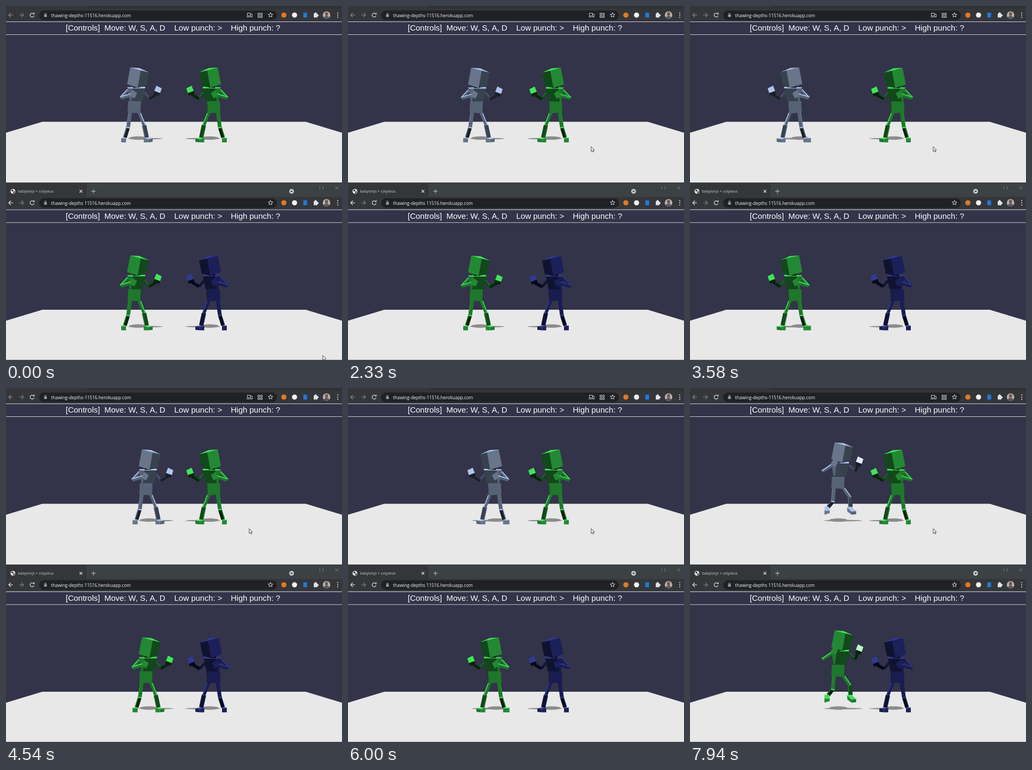
An HTML page with a canvas for the animation above (8000 ms loop, 630 by 662 pixels).

```html
<!DOCTYPE html>
<html lang="en">
<head>
<meta charset="utf-8">
<title>Fighters in two windows</title>
<style>
html, body { margin: 0; width: 100%; height: 100%; overflow: hidden; background: #333349; }
canvas { display: block; }
</style>
</head>
<body>
<canvas id="stage" width="630" height="662"></canvas>
<script>
const ctx = document.getElementById('stage').getContext('2d');
const LOOP = 8000, CENTER = 315;
const UI_FONT = '"Open Sans", "Noto Sans", sans-serif';

const palettes = {
  grey:  { light: '#acc5ee', face: '#69758b', mid: '#566377', dark: '#37424f', deep: '#191f27' },
  green: { light: '#3fe557', face: '#238833', mid: '#1e772b', dark: '#12481b', deep: '#07230b' },
  blue:  { light: '#303a95', face: '#1b205a', mid: '#181c50', dark: '#101330', deep: '#070816' }
};

// Joint x is relative to the fighter's centre; the fighter faces right.
const guard = {
  head: [0, 115], chest: [0, 153], hips: [0, 178],
  shoulderL: [-12, 157], elbowL: [-26, 172], handL: [-2, 165],
  shoulderR: [18, 162], elbowR: [27, 173], handR: [44, 157],
  hipL: [-8, 199], kneeL: [-12, 227], ankleL: [-18, 246], footL: [-20.5, 251],
  hipR: [9, 200], kneeR: [18, 223], ankleR: [23, 246], footR: [25.5, 251]
};
const leap = {
  head: [5, 102], chest: [4, 140], hips: [4, 166],
  shoulderL: [-6, 144], elbowL: [-26, 156], handL: [-3, 140],
  shoulderR: [24, 145], elbowR: [35, 156], handR: [44, 136],
  hipL: [-4, 187], kneeL: [-6, 212], ankleL: [-15, 223], footL: [-16.5, 230],
  hipR: [14, 188], kneeR: [26, 205], ankleR: [27, 223], footR: [29, 230]
};
const upperBody = ['head', 'chest', 'shoulderL', 'elbowL', 'handL', 'shoulderR', 'elbowR', 'handR'];

// Time and centre of the walking fighter.
const walk = [[3433, 241], [3770, 140], [4133, 140], [4920, 377], [4990, 362],
              [5710, 362], [6067, 255], [6300, 255], [6363, 274]];
const blueTurns = [0, 780, 1560, 2330, 3580, 4800, 6780, 7940, 9000];

const clamp = v => Math.max(0, Math.min(1, v));
const smooth = v => { v = clamp(v); return v * v * (3 - 2 * v); };
const mix = (a, b, k) => a + (b - a) * k;
const breathe = t => (1 - Math.cos(t / 1530 * 2 * Math.PI)) / 2;

function walkX(t) {
  const next = walk.findIndex(key => key[0] > t);
  if (next === 0) return walk[0][1];
  if (next < 0) return walk[walk.length - 1][1];
  const [t0, x0] = walk[next - 1], [t1, x1] = walk[next];
  return mix(x0, x1, (t - t0) / (t1 - t0));
}

function walkSway(t) {
  if (t < 3433) return breathe(t);
  if (t >= 6363) return breathe(t - 6363) * .5;
  return t >= 4990 && t < 5710 ? breathe(t - 4990) : 0;
}

function blueSway(t) {
  const i = blueTurns.findIndex(turn => turn > t) - 1;
  const k = smooth((t - blueTurns[i]) / (blueTurns[i + 1] - blueTurns[i]));
  return i % 2 ? 1 - k : k;
}

function makePose(sway, jump) {
  const pose = {};
  for (const name in guard) {
    pose[name] = [0, 1].map(axis => mix(guard[name][axis], leap[name][axis], jump));
  }
  for (const name of upperBody) {
    pose[name][0] -= sway * 2;
    pose[name][1] += sway * (name === 'handR' ? 1.5 : .6);
  }
  return pose;
}

// View is 0 at the opening stance and grows as perspective shows more of the back.
function makeFighter(color, x, dir, sway, jump = 0) {
  const view = (dir * (x - CENTER) + 74) / 190;
  return { color, x, dir, jump, view, pose: makePose(sway, jump) };
}

function poly(color, points, [dx, dy] = [0, 0]) {
  ctx.beginPath();
  for (let i = 0; i < points.length; i += 2) ctx.lineTo(points[i] + dx, points[i + 1] + dy);
  ctx.closePath();
  ctx.fillStyle = color;
  ctx.fill();
}

function rect(color, x, y, w, h) {
  ctx.fillStyle = color;
  ctx.fillRect(x, y, w, h);
}

function line(color, width, ...points) {
  ctx.beginPath();
  for (let i = 0; i < points.length; i += 2) ctx.lineTo(points[i], points[i + 1]);
  ctx.strokeStyle = color;
  ctx.lineWidth = width;
  ctx.stroke();
}

function disc(color, x, y, rx, ry = rx) {
  ctx.beginPath();
  ctx.ellipse(x, y, rx, ry, 0, 0, 7);
  ctx.fillStyle = color;
  ctx.fill();
}

function ring(color, x, y, r, from = 0, to = 2 * Math.PI) {
  ctx.beginPath();
  ctx.arc(x, y, r, from, to);
  ctx.strokeStyle = color;
  ctx.lineWidth = 1.2;
  ctx.stroke();
}

function text(value, x, y, font, color) {
  ctx.font = font;
  ctx.fillStyle = color;
  ctx.fillText(value, x, y);
}

// A limb with a lit strip; side picks the lit edge.
function limb(a, b, width, color, lit, side = 1) {
  const length = Math.hypot(b[0] - a[0], b[1] - a[1]);
  const nx = (b[1] - a[1]) / length * side, ny = -(b[0] - a[0]) / length * side;
  const shift = width / 2 - .8;
  line(color, width, ...a, ...b);
  line(lit, 1.6, a[0] + nx * shift, a[1] + ny * shift, b[0] + nx * shift, b[1] + ny * shift);
}

function drawShadow(p, c, { jump, view }) {
  const x = -17 * view;
  disc('#8b8b8b', 20 - jump * 4 + x, 248, 33 + jump * 3, 1.4);
  disc('#8b8b8b', 7 + x, 247, 17, 3.3);
}

function drawLimbs(p, c, { jump, view }) {
  limb(p.shoulderR, p.elbowR, 5, c.dark, c.mid);
  limb(p.elbowR, [p.handR[0] - 4, p.handR[1] + 8], 6, c.deep, c.dark);

  limb(p.kneeL, p.ankleL, 7, c.deep, c.mid, -1);
  limb(p.hipL, p.kneeL, 7, c.mid, c.face, -1);
  limb([p.kneeL[0] - 3, p.kneeL[1]], [p.kneeL[0] + 3, p.kneeL[1] + 1], 2, c.light, c.light);
  limb(p.kneeR, p.ankleR, 8, c.dark, c.mid, -1);
  limb(p.hipR, p.kneeR, 6, c.mid, c.light);

  const tilt = jump * 3, heel = -4.5 - 5 * view;
  poly(c.face, [heel, -4, 4.5, -4 + tilt, 4.5, 4, heel, 4 + tilt], p.footL);
  poly(c.light, [heel, -5 - tilt, 3, -5 - tilt, 4.5, -3.5 + tilt, heel, -3.5 + tilt], p.footL);
  poly(c.face, [-8.5, -4 - tilt, 0, -2 + tilt, 0, 4 + tilt, -8, 4 - tilt], p.footR);
  poly(c.mid, [0, -2 + tilt, 8.5, -3 + tilt, 8.5, 3 + tilt, 0, 4 + tilt], p.footR);
  poly(c.light, [-8.5, -4 - tilt, -1, -5 - tilt, 8.5, -3 + tilt, 0, -2 + tilt], p.footR);
}

function drawCore(p, c, { view }) {
  poly(c.mid, [-12, 0, 12, 0, 11, 23, -13, 21], p.hips);
  poly(c.dark, [12, 0, 13, 1, 12, 21, 11, 23], p.hips);

  poly(c.dark, [-4, 0, 20, 0, 15, 25, -8, 25], p.chest);
  poly(c.mid, [-13, 1, -3, 0, -6, 25, -9, 25], p.chest);
  poly(c.light, [-14, -1, 20, -2, 20, 1, -12, 1], p.chest);

  const edge = 4 * view;
  poly(c.deep, [-3, 33, 8, 33, 8, 38, -3, 38], p.head);
  poly(c.face, [-8, 0, 12 + edge, 5, 6 + edge, 38, -14, 31], p.head);
  poly(c.dark, [12 + edge, 5, 27, 9, 22, 34, 6 + edge, 38], p.head);
  poly(c.light, [-8, 0, 9, 1, 27, 9, 12 + edge, 5.5], p.head);
}

function drawNearArm(p, c, { jump }) {
  limb(p.shoulderL, p.elbowL, 5, c.mid, c.light, -1);
  limb(p.elbowL, p.handL, 6 - jump * 2, c.mid, c.light);
  poly(c.face, [-2, -8, 7, -2, 2, 8, -7, 3], p.handL);
  poly(c.dark, [7, -2, 10, 1, 5, 9, 2, 8], p.handL);
}

function drawFist(p, c, { jump }) {
  poly(c.light, [-3, -8, 7, -3, 4, 6, -7, 2], p.handR);
  poly(`rgba(255,255,255,${jump * .65})`, [-3, -8, 7, -3, 4, 6, -7, 2], p.handR);
  poly(c.deep, [-7, 2, 4, 6, 2, 11, -8, 8], p.handR);
}

function drawLayer(draw, [left, right]) {
  const middle = (left.x + right.x) / 2;
  for (const fighter of [left, right]) {
    ctx.save();
    if (draw === drawCore) {
      // Overlapping bodies meet halfway between the two fighters.
      ctx.beginPath();
      ctx.rect(fighter === left ? 0 : middle, 54, fighter === left ? middle : 630, 276);
      ctx.clip();
    }
    ctx.translate(fighter.x, 0);
    ctx.scale(fighter.dir, 1);
    draw(fighter.pose, palettes[fighter.color], fighter);
    ctx.restore();
  }
}

function drawArena(fighters) {
  rect('#333349', 0, 29, 630, 301);
  poly('#e8e8e8', [0, 237, 68, 216.5, 562, 216.5, 630, 237, 630, 330, 0, 330]);
  for (const draw of [drawShadow, drawLimbs, drawCore, drawNearArm, drawFist]) {
    drawLayer(draw, fighters);
  }
  rect('#d0d0d6', 0, 29, 630, 1);
  rect('#c8c8d0', 0, 53, 630, 1);
  const labels = [['[Controls]', 112], ['Move: W, S, A, D', 184.5],
                  ['Low punch: >', 315.5], ['High punch: ?', 421.5]];
  for (const [label, x] of labels) {
    text(label, x, 46.2, '15px "Liberation Sans", Arial, sans-serif', '#ffffff');
  }
}

function drawArrow(x, dir, color) {
  line(color, 1.2, x - 4 * dir, 17, x + 4 * dir, 17);
  line(color, 1.2, x, 13, x + 4 * dir, 17, x, 21);
}

function drawStar(x, y) {
  const points = [];
  for (let i = 0; i <= 10; i++) {
    const r = i % 2 ? 2 : 4.6, a = i * Math.PI / 5 - Math.PI / 2;
    points.push(x + r * Math.cos(a), y + r * Math.sin(a));
  }
  line('#d5d7da', 1, ...points);
}

function drawToolbar(address, active) {
  const icon = '#dee1e6';
  rect('#35363a', 0, 5, 630, 24);
  drawArrow(9, -1, active ? icon : '#85888c');
  drawArrow(29, 1, '#7b7e82');
  ring(icon, 49, 17, 3.7, .3, 5.5);
  poly(icon, [50, 15.5, 53.5, 15.5, 53.5, 12]);
  ctx.beginPath();
  ctx.roundRect(62, 8.5, 446, 18, 9);
  ctx.fillStyle = '#202124';
  ctx.fill();
  rect('#9aa0a6', 71.5, 16, 5, 4.5);
  ring('#9aa0a6', 74, 15.5, 1.7, Math.PI, 0);
  text(address, 84.5, 20.5, '8.3px ' + UI_FONT, '#f4f5f7');

  if (!active) {
    ctx.strokeStyle = '#c4c7ca';
    ctx.lineWidth = 1;
    ctx.strokeRect(452.5, 13.5, 6, 5);
    ctx.strokeRect(458.5, 15.5, 3, 5);
    line('#c4c7ca', 1, 451, 20.5, 457, 20.5);
    for (const x of [472.5, 477.5]) for (const y of [13.5, 18.5]) ctx.strokeRect(x, y, 3, 3);
  }
  drawStar(496, 17);
  disc('#e27a25', 521, 17, 4.8);
  disc('#f3f3f3', 541, 17, 4.8);
  rect('#1e7ae0', 557.5, 12.5, 7, 9);
  rect(icon, 577, 14, 7, 7.5);
  disc(icon, 580.5, 13.5, 1.8);
  disc(icon, 584.5, 17.5, 1.8);

  ctx.save();
  ctx.beginPath();
  ctx.arc(601, 17, 7, 0, 7);
  ctx.clip();
  rect('#b9b4b2', 594, 10, 14, 14);
  disc('#76594e', 601, 15, 3, 3.7);
  disc('#5c5663', 601, 24, 6, 5.5);
  ctx.restore();
  for (const y of [13, 17, 21]) disc(icon, 622, y, 1.1);
}

function drawTabs() {
  rect('#3c4143', 0, 330, 630, 27);
  rect('#35363a', 0, 332, 151, 25);
  disc('#e8eaed', 13, 346.5, 4.5);
  poly('#35363a', [10, 344, 13, 343, 14, 346, 11, 347]);
  poly('#35363a', [14, 347, 17, 346, 15, 350, 13, 350]);
  text('babylonjs + colyseus', 22.5, 349.3, '7px ' + UI_FONT, '#c9ccd0');
  line('#dee1e6', 1.1, 138, 344, 143, 349);
  line('#dee1e6', 1.1, 143, 344, 138, 349);
  line('#b8bcc0', 1.1, 160, 346.5, 168, 346.5);
  line('#b8bcc0', 1.1, 164, 342.5, 164, 350.5);
  disc('#c6c9cc', 535.5, 346.5, 4.5);
  poly('#3c4143', [533, 345.5, 538, 345.5, 535.5, 348.5]);
  line('#767b7e', 1, 588.5, 337, 588.5, 343);
  line('#767b7e', 1, 594.5, 337, 594.5, 343);
  line('#767b7e', 1, 617, 337, 623, 343);
  line('#767b7e', 1, 623, 337, 617, 343);
}

function drawCursor(t) {
  const k = smooth((t - 130) / 820);
  const at = [mix(594, 456, k), mix(653.5, 263, k)];
  const outline = [0, 0, 0, 9, 2, 7.2, 3.4, 10, 5, 9.3, 3.7, 6.5, 6, 6.2];
  poly('#ffffff', outline, at);
  ctx.strokeStyle = '#33333a';
  ctx.lineWidth = .9;
  ctx.stroke();
}

function shifted(y, draw, ...args) {
  ctx.save();
  ctx.translate(0, y);
  draw(...args);
  ctx.restore();
}

function render(now) {
  const t = now % LOOP;
  const jump = smooth((t - 7690) / 250);
  const facingLeft = t >= 3433 && t < 4133 || t >= 5710 && t < 6300;
  const player = color => makeFighter(color, walkX(t), facingLeft ? -1 : 1, walkSway(t), jump);
  const rival = (color, sway) => makeFighter(color, 389, -1, sway);

  drawToolbar('thawing-depths-11516.herokuapp.com', false);
  rect('#2f3235', 0, 0, 630, 5);
  rect('#35363a', 0, 0, 151, 5);
  drawArena([player('grey'), rival('green', breathe(t))]);

  shifted(351, drawToolbar, 'thawing-depths 11516.herokuapp.com', true);
  drawTabs();
  shifted(351.5, drawArena, [player('green'), rival('blue', blueSway(t))]);
  rect('#b4b4b8', 0, 661, 630, 1);
  drawCursor(t);
  requestAnimationFrame(render);
}
requestAnimationFrame(render);
</script>
</body>
</html>
```
